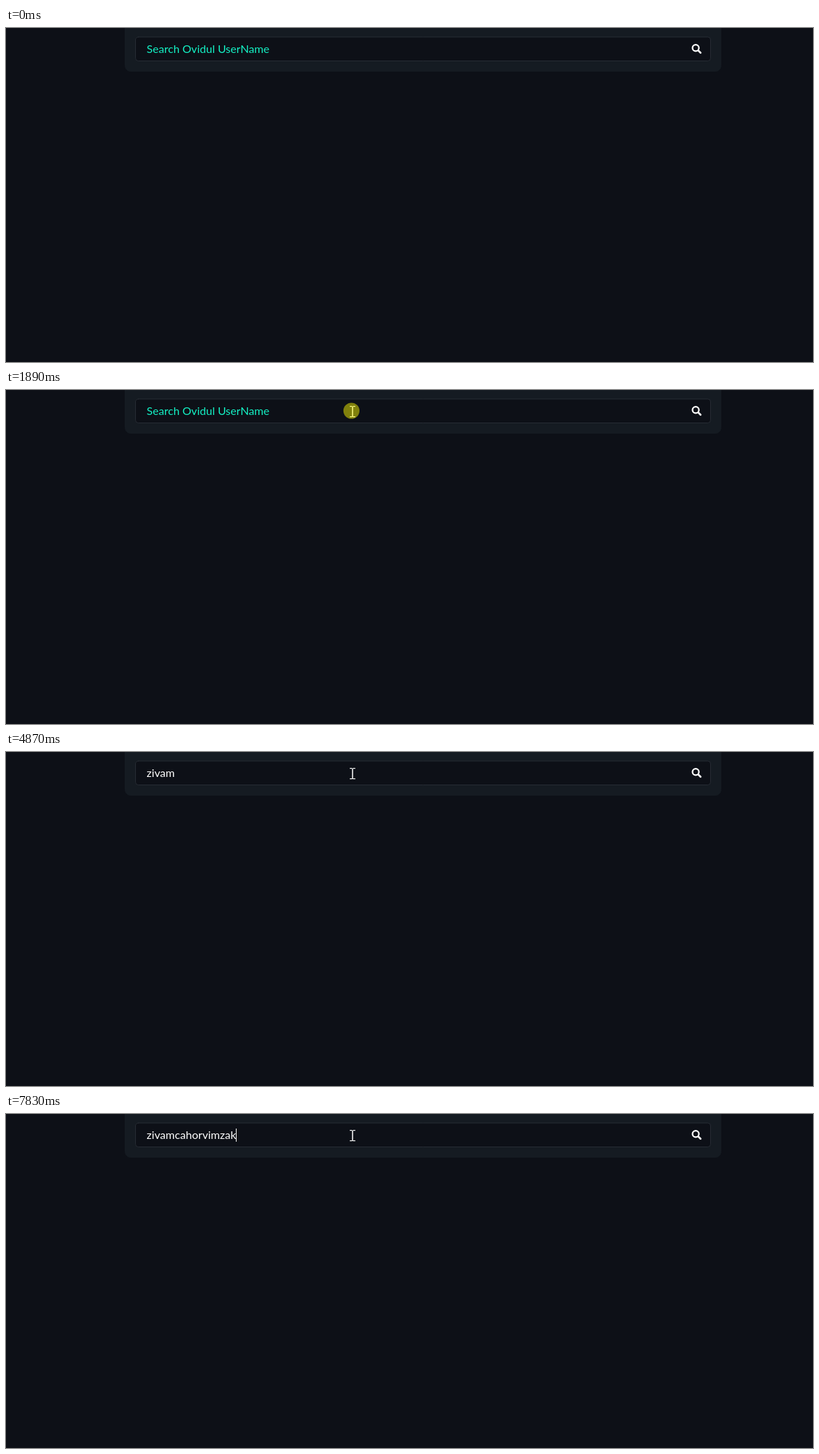
An HTML page with a canvas for the animation above (8000 ms loop, 1162 by 482 pixels).

```html
<!DOCTYPE html>
<html lang="en">
<head>
<meta charset="utf-8">
<title>User search</title>
<style>
  html, body { margin: 0; width: 100%; height: 100%; overflow: hidden; background: #0d1017; }
  canvas { display: block; }
</style>
</head>
<body>
<canvas id="stage" width="1162" height="482"></canvas>
<script>
const ctx = document.getElementById('stage').getContext('2d');
const LOOP = 8000, TICK = 79, ENTER = 114, CLICK = 1890, BLINK = 560;
const FOCUS = CLICK + 60;   // caret shows, click mark goes
const TEXT_X = 202.5, TEXT_Y = 36;

// The name is typed in bursts of evenly spaced keys
const BURSTS = [
  { text: 'zi', start: 3580, gap: 80 },
  { text: 'vam', start: 3970, gap: 170 },
  { text: 'ca', start: 5140, gap: 230 },
  { text: 'hor', start: 6180, gap: 120 },
  { text: 'vimzak', start: 7010, gap: 164 }
];
const KEYS = BURSTS.flatMap(({ text, start, gap }) =>
  [...text].map((char, i) => ({ char, time: start + i * gap })));

// Resting and turning points of the pointer
const PATH = [
  { time: ENTER, x: 1007, y: 468 },
  { time: 351, x: 731, y: 206 },
  { time: 509, x: 731, y: 206 },
  { time: 746, x: 457, y: 90 },
  { time: 1457, x: 499, y: 31 }
];

const clamp = v => Math.max(0, Math.min(1, v));
const smooth = v => v * v * (3 - 2 * v);
const mix = (a, b, p) => a + (b - a) * p;
const tick = t => ENTER + Math.floor((t - ENTER) / TICK) * TICK;

function box(x, y, w, h, r, fill, stroke = fill) {
  ctx.beginPath();
  ctx.roundRect(x, y, w, h, r);
  ctx.fillStyle = fill;
  ctx.fill();
  ctx.strokeStyle = stroke;
  ctx.lineWidth = 1;
  ctx.stroke();
}

function drawSearchIcon() {
  ctx.strokeStyle = '#fff';
  ctx.lineCap = 'round';
  ctx.lineWidth = 2.2;
  ctx.beginPath();
  ctx.arc(993.1, 28.7, 4.6, 0, 2 * Math.PI);
  ctx.stroke();
  ctx.lineWidth = 2.7;
  ctx.beginPath();
  ctx.moveTo(997, 32.6);
  ctx.lineTo(1000.1, 35.7);
  ctx.stroke();
}

function drawField(t) {
  box(171.5, -12, 858, 74.5, 8, '#151b22');
  box(186.5, 13, 828, 34.5, 4, '#0d1017', '#272c34');
  drawSearchIcon();

  const pressed = KEYS.filter(key => key.time <= t);
  const typed = pressed.map(key => key.char).join('');
  ctx.font = '16.1px Lato, sans-serif';
  ctx.fillStyle = '#fff';
  if (typed) {
    ctx.fillText(typed, TEXT_X, TEXT_Y);
  } else {
    ctx.globalAlpha = 1 - 0.77 * clamp((tick(t) - CLICK) / 270);
    ctx.fillStyle = '#14f1c5';
    ctx.fillText('Search Ovidul UserName', TEXT_X, TEXT_Y);
    ctx.globalAlpha = 1;
  }

  const blinkStart = typed ? pressed.at(-1).time : FOCUS - 100;
  if (t >= FOCUS && Math.floor((t - blinkStart) / BLINK) % 2 === 0) {
    ctx.fillStyle = '#fff';
    ctx.fillRect(Math.round(TEXT_X + ctx.measureText(typed).width), 21, 1, 19);
  }
}

function drawArrow(x, y) {
  ctx.save();
  ctx.translate(x, y);
  ctx.fillStyle = '#fff';
  ctx.fill(new Path2D('M0 -0.5V13.5L3 10.8L5.2 15.5L7.6 14.5L5.5 9.8H10Z'));
  ctx.restore();
}

function drawBeam(x, y) {
  x = Math.round(x);
  y = Math.round(y);
  ctx.fillStyle = '#fff';
  ctx.fillRect(x - 0.75, y - 7, 1.5, 15);
  for (const edge of [y - 8, y + 7]) {
    ctx.fillRect(x - 4, edge, 3.5, 1.2);
    ctx.fillRect(x + 0.5, edge, 3.5, 1.2);
  }
}

function drawPointer(t) {
  if (t < ENTER) return;
  const now = tick(t);
  const i = PATH.findLastIndex(point => point.time <= now);
  const from = PATH[i], to = PATH[i + 1] || from;
  const p = smooth(clamp((now - from.time) / (to.time - from.time || 1)));
  const x = mix(from.x, to.x, p), y = mix(from.y, to.y, p);
  (y < 48 ? drawBeam : drawArrow)(x, y);

  if (t >= CLICK && t < FOCUS) {
    ctx.fillStyle = 'rgba(255, 250, 0, 0.48)';
    ctx.beginPath();
    ctx.arc(497.4, 30, 11.6, 0, 2 * Math.PI);
    ctx.fill();
  }
}

function render() {
  const t = performance.now() % LOOP;
  ctx.fillStyle = '#0d1017';
  ctx.fillRect(0, 0, 1162, 482);
  drawField(t);
  drawPointer(t);
  requestAnimationFrame(render);
}
render();
</script>
</body>
</html>
```
